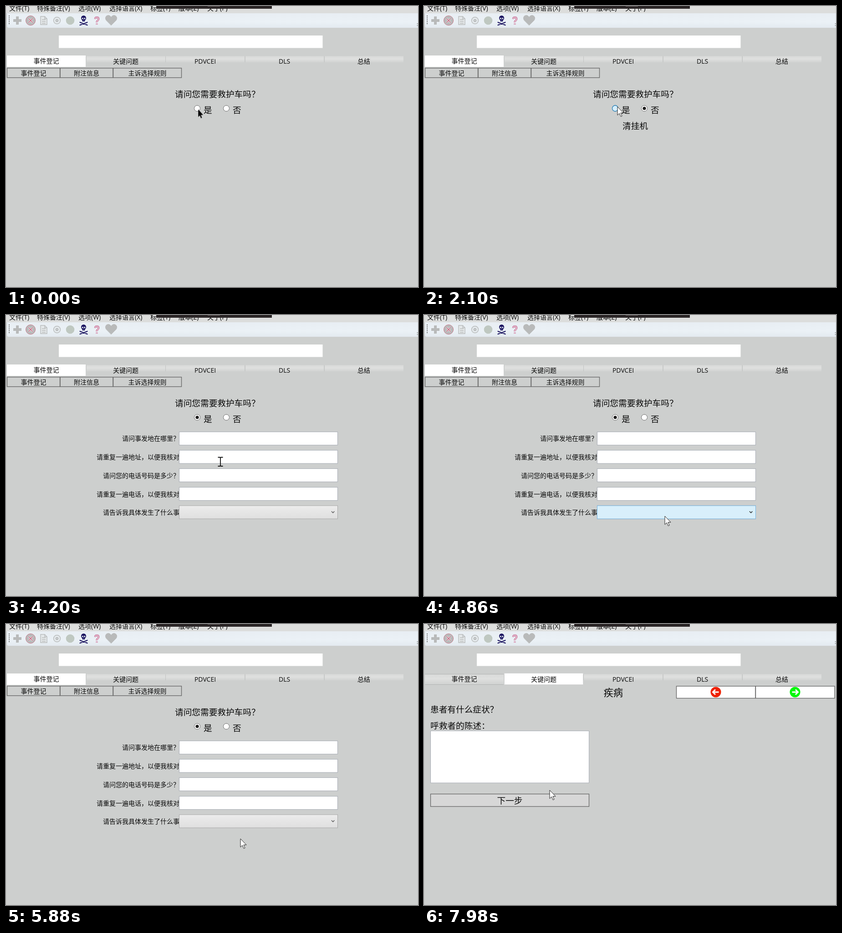
These frames come from a looping animation (905 px wide and 619 px high, 8000 ms). An HTML page:

```html
<!DOCTYPE html>
<html lang="zh-CN">
<head>
<meta charset="utf-8">
<title>事件登记</title>
<style>
html, body { margin: 0; width: 100%; height: 100%; overflow: hidden; background: #cdcfce; }
svg { display: block; width: 905px; height: 619px; }
text { font: 14px "Open Sans", "Noto Sans CJK SC", "Noto Sans CJK", sans-serif; fill: #080808; white-space: pre; }
.big text, text.big { font-size: 18.67px; }
.item { font-size: 16.67px; }
.title { font-size: 21.33px; }
.mid { text-anchor: middle; }
.end { text-anchor: end; }
.field { fill: #fff; stroke: #a8adb5; }
.btn { fill: none; stroke: #6b6b6b; stroke-width: 1.4; }
.ring { fill: #fff; stroke: #6c6c6c; }
.hot { fill: #d6effc; stroke: #3488bd; stroke-width: 1.4; }
.line { fill: none; stroke: #222; stroke-width: 1.4; }

/* Everything below shares one 8 s clock. */
.t { animation: 8s step-end infinite; }
.first { animation-name: first; }
.second { animation-name: second; }
.hangup { animation-name: hangup; }
.form { animation-name: form; }
.yes-hot { animation-name: yes-hot; }
.no-hot { animation-name: no-hot; }
.combo-hot { animation-name: combo-hot; }
.list { animation: list 8s linear infinite; }
.pick { animation-name: pick; }
.dark { animation-name: dark; }
.arrow { animation-name: arrow; }
.beam { animation-name: beam; }
.cursor { animation: move 8s ease-in-out infinite; }

@keyframes first { 0% { opacity: 1 } 74.25% { opacity: 0 } }
@keyframes second { 0% { opacity: 0 } 74.25% { opacity: 1 } }
@keyframes hangup { 0% { opacity: 0 } 14.25% { opacity: 1 } 27% { opacity: 0 } }
@keyframes form { 0% { opacity: 0 } 27% { opacity: 1 } }
@keyframes yes-hot { 0% { opacity: 0 } 3.75% { opacity: 1 } 6.75% { opacity: 0 } 24% { opacity: 1 } 30.75% { opacity: 0 } }
@keyframes no-hot { 0% { opacity: 0 } 12% { opacity: 1 } 20.25% { opacity: 0 } }
@keyframes combo-hot { 0% { opacity: 0 } 59.25% { opacity: 1 } 66% { opacity: 0 } }
@keyframes list {
  0%, 63.74% { opacity: 0; clip-path: inset(0 -8px 100% 0) }
  63.75% { opacity: 1; clip-path: inset(0 -8px 70% 0) }
  66%, 73.49% { opacity: 1; clip-path: inset(0 -8px -8px 0) }
  73.5%, 100% { opacity: 0; clip-path: inset(0 -8px -8px 0) }
}
@keyframes pick { 0% { opacity: 0 } 67.5% { opacity: 1 } }
@keyframes dark { 0% { opacity: 1 } 3.75% { opacity: 0 } }
@keyframes arrow { 0% { opacity: 0 } 3.75% { opacity: 1 } 33% { opacity: 0 } 54% { opacity: 1 } 90% { opacity: 0 } 97.5% { opacity: 1 } }
@keyframes beam { 0% { opacity: 0 } 33% { opacity: 1 } 54% { opacity: 0 } 90% { opacity: 1 } 97.5% { opacity: 0 } }
@keyframes move {
  0%, 3.75% { transform: translate(422px, 227px) }
  13.5%, 18.75% { transform: translate(483px, 230px) }
  25.5%, 29.25% { transform: translate(425px, 222px) }
  39%, 39.75% { transform: translate(460px, 274px) }
  49.5%, 52.5% { transform: translate(471px, 323px) }
  56.25%, 59.2% { transform: translate(526px, 451px) }
  60%, 64.5% { transform: translate(529px, 443px) }
  69.5%, 73.5% { transform: translate(515px, 473px) }
  79.5% { transform: translate(640px, 182px) }
  83.25% { transform: translate(640px, 182px); animation-timing-function: ease-in }
  86.25% { transform: translate(567px, 222px); animation-timing-function: ease-out }
  92.25%, 96% { transform: translate(305px, 338px) }
  99.6%, 100% { transform: translate(276px, 366px) }
}
</style>
</head>
<body>
<svg viewBox="0 0 905 619">
  <defs>
    <linearGradient id="bar" x2="0" y2="1">
      <stop stop-color="#e8eef3"/><stop offset=".6" stop-color="#ebf1f6"/><stop offset="1" stop-color="#e3eaf0"/>
    </linearGradient>
    <linearGradient id="tab" x2="0" y2="1">
      <stop stop-color="#d9dad9"/><stop offset=".45" stop-color="#dfe0df"/><stop offset="1" stop-color="#d0d2d1"/>
    </linearGradient>
    <linearGradient id="combo" x2="0" y2="1">
      <stop stop-color="#ececec"/><stop offset="1" stop-color="#dfdfdf"/>
    </linearGradient>
    <pattern id="weave" width="2" height="2" patternUnits="userSpaceOnUse">
      <path fill="#cbcdcd" d="M0 0h2v2H0z"/><path fill="#a6a7a7" d="M0 0h1v1H0zM1 1h1v1H1z"/>
    </pattern>
    <path id="pointer" d="M0 0V18.5L4.2 14.6L7.3 21.6L10 20.4L7 13.6H13Z"/>
    <path id="chevron" d="M715 432.5l3.2 3.2l3.2-3.2"/>
    <path id="go" d="M-6.5 0H6M1-5.5L6.5 0L1 5.5"/>
    <path id="ask" fill="none" d="M195.8 28.500q0-3.500 3.800-3.500t3.800 3.500q0 2.300-2.200 3.700t-1.700 4M199.500 38.500v2.500"/>
  </defs>

  <rect width="905" height="619" fill="#cdcfce"/>

  <!-- menu -->
  <rect width="905" height="16" fill="#dcdddc"/>
  <g>
    <text x="7" y="10">文件(T)</text><text x="68" y="10">特殊备注(V)</text>
    <text x="159" y="10">选项(W)</text><text x="227" y="10">选择语言(X)</text>
    <text x="317" y="10">标签(T)</text><text x="379" y="10">版本(Z)</text><text x="442" y="10">关于(P)</text>
  </g>
  <rect x="330" width="254" height="6" fill="#2a2526"/>
  <rect x="443" width="27" height="1" fill="#77706f"/>

  <!-- toolbar -->
  <path fill="url(#bar)" d="M2 16H905V48H6Q2 48 2 44Z"/>
  <path stroke="#666" stroke-width="2" stroke-dasharray="2 2.2" d="M7 21V42"/>
  <path stroke="#666" d="M903.5 38v2m0 2v2"/>
  <path fill="url(#weave)" d="M22 23h6v6h6v6h-6v6h-6v-6h-6v-6h6z"/>
  <circle cx="54" cy="32" r="10.5" fill="url(#weave)" stroke="#c8788a"/>
  <path stroke="#e6dfe3" stroke-width="3.4" d="M49.5 27.5l9 9m0-9l-9 9"/>
  <path stroke="#c9607a" stroke-width="1.3" d="M49.5 27.5l9 9m0-9l-9 9"/>
  <path fill="#e4e8ea" stroke="#b9bcbc" stroke-width="1.4" d="M76 23h9l5 5v13H76zM85 23v5h5M79 30h8m-8 4h8m-8 4h8"/>
  <circle cx="112" cy="32" r="7.5" fill="#e4e9ec" stroke="#b8bbbb" stroke-width="1.4"/>
  <circle cx="112" cy="32" r="2.2" fill="none" stroke="#a9abab" stroke-width="1.6"/>
  <circle cx="141" cy="32" r="9.3" fill="#bfc8c1"/>
  <g fill="#1b1460">
    <path stroke="#1b1460" stroke-width="2.2" stroke-linecap="round" d="M162.500 36l16 6m0-6l-16 6"/>
    <path d="M165 26.500a5.500 5.500 0 0 1 11 0q0 3.500-2.500 4.500v3h-6v-3q-2.500-1-2.500-4.500z"/>
    <g fill="#e8eef3"><circle cx="168.300" cy="27.300" r="1.600"/><circle cx="172.700" cy="27.300" r="1.600"/><path d="M170.500 29.500l1 2h-2z"/></g>
  </g>
  <use href="#ask" stroke="#b8487a" stroke-width="3.600"/>
  <use href="#ask" stroke="#f3dde4" stroke-width="1.700"/>
  <path fill="url(#weave)" d="M231 43L220 32q-4-5 0-10q6-5 11 2q5-7 11-2q4 5 0 10z"/>

  <rect x="116" y="65" width="579.500" height="27.500" fill="#fff"/>

  <!-- tabs -->
  <path fill="url(#tab)" d="M177 110.500h173v14H177zM351 110.500h173v14H351zM526 110.500h172v14H526zM700 110.500h173v14H700z"/>
  <path stroke="#c1c3c2" d="M350.500 111v13M525 111v13M699.500 111v13"/>
  <rect class="t first" x="2" y="109" width="173" height="25" fill="#fff"/>
  <g class="t second">
    <rect x="2" y="110" width="173" height="23" fill="url(#tab)"/>
    <path fill="none" stroke="#b2b4b3" d="M2 110.500H175M2 133.500H175"/>
    <rect x="176.500" y="108.500" width="173" height="25" fill="#fff" stroke="#d8d9d9"/>
  </g>
  <g class="mid">
    <text x="88.500" y="126">事件登记</text><text x="263" y="127">关键问题</text>
    <text x="437.500" y="127">PDVCEI</text><text x="611.500" y="127">DLS</text><text x="786" y="127">总结</text>
  </g>

  <!-- registration page -->
  <g class="t first">
    <g class="btn">
      <rect x="2.500" y="136.800" width="116" height="21"/><rect x="119" y="136.800" width="116" height="21"/>
      <rect x="235.500" y="136.800" width="150" height="21"/>
    </g>
    <g class="mid">
      <text x="60.500" y="153">事件登记</text><text x="177" y="153">附注信息</text><text x="310.500" y="153">主诉选择规则</text>
    </g>
    <g class="big">
      <text x="371" y="201">请问您需要救护车吗？</text>
      <text x="434" y="236">是</text><text x="498" y="236">否</text>
      <text class="t hangup" x="436" y="271">清挂机</text>
    </g>
    <circle class="ring" cx="420" cy="225.500" r="6.500"/>
    <circle class="t yes-hot hot" cx="420" cy="225.500" r="6.500"/>
    <circle class="ring" cx="484" cy="225.500" r="6.500"/>
    <circle class="t no-hot hot" cx="484" cy="225.500" r="6.500"/>
    <circle class="t hangup" cx="484" cy="225.500" r="3.600" fill="#1c1c1c"/>

    <g class="t form">
      <circle cx="420" cy="225.500" r="3.600" fill="#1c1c1c"/>
      <g class="end">
        <text x="381" y="277">请问事发地在哪里？</text>
        <text x="381" y="318">请重复一遍地址，以便我核对</text>
        <text x="381" y="358.500">请问您的电话号码是多少？</text>
        <text x="381" y="399.500">请重复一遍电话，以便我核对</text>
        <text x="381" y="440">请告诉我具体发生了什么事</text>
      </g>
      <g class="field">
        <rect x="380.500" y="257.500" width="348" height="29"/><rect x="380.500" y="298" width="348" height="29"/>
        <rect x="380.500" y="338.500" width="348" height="29"/><rect x="380.500" y="379.500" width="348" height="29"/>
      </g>
      <rect x="380.500" y="420" width="348" height="29" fill="url(#combo)" stroke="#a9a9a9"/>
      <use href="#chevron" class="line" style="stroke:#555"/>
      <g class="t combo-hot">
        <rect x="380.500" y="420" width="348" height="29" fill="#d8effb" stroke="#74b4e2"/>
        <use href="#chevron" class="line"/>
      </g>
    </g>

    <g class="list">
      <rect x="386" y="455" width="347" height="51" fill="#000" opacity=".12"/>
      <rect x="385" y="454" width="347" height="51" fill="#000" opacity=".22"/>
      <rect x="384" y="453" width="347" height="51" fill="#000" opacity=".28"/>
      <rect x="380.500" y="450.500" width="348" height="51.500" fill="#fff" stroke="#707070"/>
      <rect class="t pick" x="381.500" y="451" width="346" height="25.500" fill="#b1e2fd" stroke="#2b9bd3"/>
      <text class="item" x="387" y="470.500">疾病</text><text class="item" x="387" y="496">创伤</text>
    </g>
  </g>

  <!-- key questions page -->
  <g class="t second">
    <text class="title" x="394.500" y="159">疾病</text>
    <g class="btn" style="fill:#fff">
      <rect x="554.500" y="137" width="173.500" height="26.500"/><rect x="728.500" y="137" width="173.500" height="26.500"/>
    </g>
    <circle cx="641" cy="150" r="11.500" fill="#ee2000"/><circle cx="815" cy="150" r="11.500" fill="#00f808"/>
    <g fill="none" stroke="#fff" stroke-width="3">
      <use href="#go" transform="translate(641 150) scale(-1 1)"/><use href="#go" transform="translate(815 150)"/>
    </g>
    <rect class="field" x="14.500" y="235.500" width="348" height="114.500"/>
    <rect x="14.500" y="374.500" width="348" height="27.500" fill="#d7d7d7" stroke="#666" stroke-width="1.300"/>
    <g class="big">
      <text x="14" y="195">患者有什么症状？</text><text x="14" y="230.500">呼救者的陈述：</text>
      <text class="mid" x="188.500" y="396">下一步</text>
    </g>
  </g>

  <g class="cursor">
    <use href="#pointer" class="t dark" transform="translate(.3 .7) scale(.82 .9)"/>
    <use href="#pointer" class="t arrow" fill="#fff" stroke="#222"/>
    <path class="t beam line" style="stroke:#111;stroke-width:1.800" d="M-5.500-9.500h4.300L0-8.500l1.200-1h4.300M0-9V9.500M-5.500 10h4.300L0 9l1.200 1h4.300"/>
  </g>
</svg>
</body>
</html>
```
